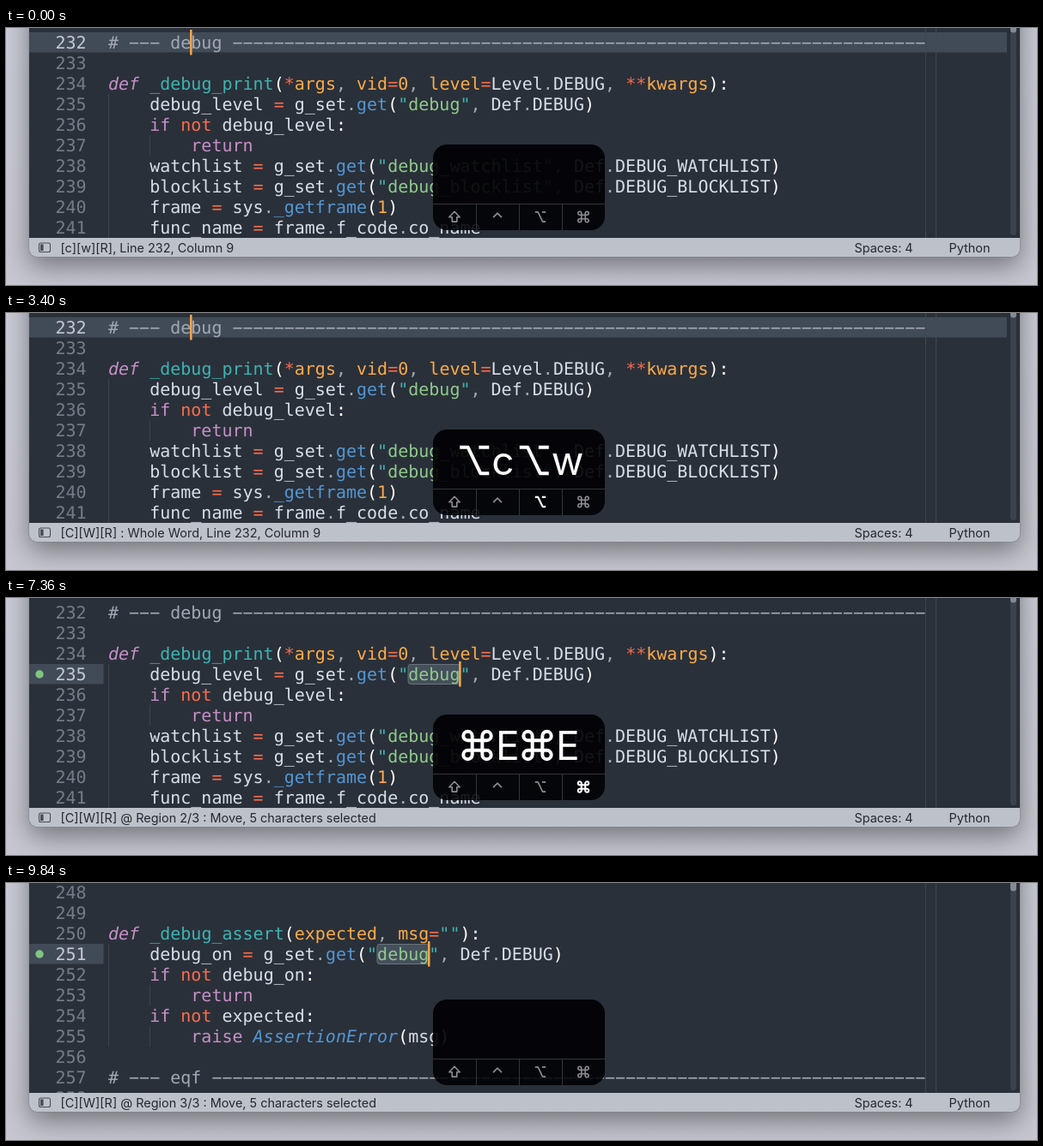
Animation, 1200 px wide and 300 px high, one loop 9.88 s. Source, as an HTML page:

```html
<!DOCTYPE html>
<html lang="en">
<head>
<meta charset="utf-8">
<title>Editor: find by region</title>
<style>
  html, body { margin: 0; width: 100%; height: 100%; overflow: hidden; background: #c3c5cf; }
  svg { display: block; width: 100%; height: 100%; }
  text { white-space: pre; }
  #doc text { font: 20px "DejaVu Sans Mono", monospace; fill: #d8dee9; text-rendering: geometricPrecision; }
  #doc .num { fill: #747c87; }
  #doc .num.on { fill: #c3c8d1; }
  .kw { fill: #c78fc8; }
  .it { font-style: italic; }
  .op { fill: #fb6c4b; }
  .name { fill: #3cb4b2; }
  .call { fill: #5396d3; }
  .arg { fill: #fcab48; }
  .str { fill: #8fca8c; }
  .dim { fill: #a2a8b4; }
  .br { fill: #fff; }
  .bar { font: 14.45px Inter, sans-serif; fill: #25282d; }
  .big { font: 46px Inter, sans-serif; fill: #fff; }
  .line { fill: none; stroke-linejoin: round; }
</style>
</head>
<body>
<svg viewBox="0 0 1200 300" xmlns="http://www.w3.org/2000/svg">
  <defs>
    <linearGradient id="desk" x2="0" y2="1">
      <stop offset="0" stop-color="#c9ccd6"/>
      <stop offset="1" stop-color="#c6c6d0"/>
    </linearGradient>
    <filter id="blur" x="-10%" y="-20%" width="120%" height="150%"><feGaussianBlur stdDeviation="15"/></filter>
    <clipPath id="pane"><rect x="27" width="1153" height="245"/></clipPath>
    <clipPath id="hud"><rect x="497" y="136" width="200" height="100" rx="16"/></clipPath>
  </defs>

  <rect width="1200" height="300" fill="url(#desk)"/>
  <rect x="27" y="-120" width="1153" height="398" rx="10" fill="#000" opacity=".42" filter="url(#blur)"/>
  <rect x="26.5" y="-50" width="1154" height="317.5" rx="9" fill="#7f838c"/>
  <rect x="27" y="-50" width="1153" height="317" rx="9" fill="#bdc1ca"/>

  <g clip-path="url(#pane)">
    <rect x="27" width="1153" height="245" fill="#2a3039"/>
    <g id="doc">
      <rect id="row" x="27" height="23.5" fill="#414b58"/>
      <g id="guides" stroke="#3d444e"></g>
      <rect id="sel" width="60.5" height="23" rx="3" fill="#46505c" stroke="#69747f"/>
      <g id="code"></g>
      <circle id="dot" cx="39" r="4.7" fill="#82c483"/>
      <rect id="caret" width="2.4" height="29.5" fill="#fcab48"/>
    </g>
    <path d="M1070.5 0V245M1082.5 0V245" stroke="#3e4650"/>
    <rect x="1169" y="-20" width="7" height="262" rx="3.5" fill="#3c434d"/>
    <rect id="thumb" x="1169" y="-20" width="7" rx="3.5" fill="#858b94"/>
  </g>

  <rect x="38.5" y="251" width="13" height="10.5" rx="2" fill="none" stroke="#4b4f57" stroke-width="1.1"/>
  <rect x="40" y="252.5" width="3.6" height="7.5" fill="#4b4f57"/>
  <text id="status" class="bar" x="63.5" y="261.5"></text>
  <text class="bar" x="987.5" y="261.5">Spaces: 4</text>
  <text class="bar" x="1097.5" y="261.5">Python</text>

  <g clip-path="url(#hud)">
    <rect x="497" y="136" width="200" height="70" fill="#000004" opacity=".91"/>
    <rect x="497" y="206" width="200" height="30" fill="#000004" opacity=".88"/>
    <path d="M497 205.5H697M547.5 206V236M597.5 206V236M647.5 206V236" stroke="#34353a"/>
  </g>
  <g id="mods"></g>
  <g id="keys"></g>
</svg>
<script>
const $ = id => document.getElementById(id);
const LOOP = 9880, PITCH = 24, COL = 12.041, LEFT = 119, FIRST = 232;
const rule = (name, n = 79) => `# \u2212\u2212\u2212 ${name} `.padEnd(n, '\u2212');

const lines = [
  rule('debug'),
  '',
  'def _debug_print(*args, vid=0, level=Level.DEBUG, **kwargs):',
  '    debug_level = g_set.get("debug", Def.DEBUG)',
  '    if not debug_level:',
  '        return',
  '    watchlist = g_set.get("debug_watchlist", Def.DEBUG_WATCHLIST)',
  '    blocklist = g_set.get("debug_blocklist", Def.DEBUG_BLOCKLIST)',
  '    frame = sys._getframe(1)',
  '    func_name = frame.f_code.co_name',
  '    line_num = frame.f_lineno',
  '    if func_name in watchlist or \\',
  '       (not watchlist and func_name not in blocklist):',
  '        print("{} {}():{} [{}]"',
  '              .format(Level.to_str(level), func_name, line_num, vid), end=" ")',
  '        print(*args, **kwargs)',
  '',
  '',
  'def _debug_assert(expected, msg=""):',
  '    debug_on = g_set.get("debug", Def.DEBUG)',
  '    if not debug_on:',
  '        return',
  '    if not expected:',
  '        raise AssertionError(msg)',
  '',
  rule('eqf'),
  ''
];

const rowY = n => 17 + (n - FIRST) * PITCH;
const colX = c => LEFT + c * COL;
const span = (cls, s) => `<tspan class="${cls}">${s}</tspan>`;

// Syntax rules in order of priority; the first match wins.
const rules = [
  [/^#.*/, 'dim'],
  [/^"[^"]*"/, s => span('name', '"') + span('str', s.slice(1, -1)) + span('name', '"')],
  [/^def\b/, 'kw it'],
  [/^(if|return|raise)\b/, 'kw'],
  [/^(not|and|or|in)\b/, 'op'],
  [/^(print|AssertionError)\b/, 'call it'],
  [/^\w+(?=\()/, (s, def) => span(def ? 'name' : 'call', s)],
  [/^\d+/, 'arg'],
  [/^\w+(?==)/, 'arg'],
  [/^\w+(?=[,)])/, (s, def, prev) => def && prev !== '.' ? span('arg', s) : s],
  [/^\w+/, s => s],
  [/^[*=]+/, 'op'],
  [/^[.,]/, 'dim'],
  [/^[():]+/, 'br'],
  [/^(\s+|.)/, s => s]
];

function paint(src) {
  const def = src.startsWith('def');
  let out = '', i = 0;
  while (i < src.length) {
    const rest = src.slice(i);
    const [re, style] = rules.find(([r]) => r.test(rest));
    const s = re.exec(rest)[0];
    out += typeof style === 'string' ? span(style, s) : style(s, def, src[i - 1]);
    i += s.length;
  }
  return out;
}

$('code').innerHTML = lines.map((s, i) => {
  const n = FIRST + i, y = rowY(n) + 7, indent = s.search(/\S|$/);
  return `<text class="num" x="57.5" y="${y}">${n}</text>` +
    `<text x="${colX(indent)}" y="${y}">${paint(s.trim())}</text>`;
}).join('');
const nums = [...document.querySelectorAll('.num')];

$('guides').innerHTML = lines.map((s, i) => {
  const depth = Math.ceil(s.search(/\S|$/) / 4), y = rowY(FIRST + i) - 12;
  return Array.from({ length: Math.min(depth, 2) }, (_, k) =>
    `<path d="M${Math.round(colX(k * 4)) + .5} ${y}v${PITCH}"/>`).join('');
}).join('');

// Modifier marks, drawn in a box from -1 to 1.
const marks = {
  '⇧': 'M0-1L1 .05H.45V.9H-.45V.05H-1Z',
  '⌃': 'M-.8 .1L0-.7L.8 .1',
  '⌥': 'M-1-.9H-.45L.42 .9H1M.3-.9H1',
  '⌘': 'M-.36-.68V.68A.32 .32 0 1 1-.68 .36H.68A.32 .32 0 1 1 .36 .68V-.68' +
       'A.32 .32 0 1 1 .68-.36H-.68A.32 .32 0 1 1-.36-.68Z'
};
const mark = (m, x, y, size, width, color) =>
  `<path class="line" d="${marks[m]}" transform="translate(${x} ${y}) scale(${size})" ` +
  `stroke="${color}" stroke-width="${width / size}"/>`;

const drawMods = held => Object.keys(marks).map((m, i) =>
  mark(m, 522 + i * 50, 220.5, 6.2, m === held ? 2.1 : 1.6, m === held ? '#fff' : '#8d8d90')).join('');

const advance = { '⌥': 43, '⌘': 43, c: 26.5, w: 37, E: 27 };
function drawKeys(keys) {
  const total = [...keys].reduce((sum, k) => sum + advance[k], 0);
  const scale = Math.min(1, 188 / total);
  let x = -total / 2, out = '';
  for (const k of keys) {
    out += marks[k]
      ? mark(k, x + (k === '⌥' ? 23 : 21.5), 0, k === '⌥' ? 17 : 16.2, 4, '#fff')
      : `<text class="big" x="${x}" y="17">${k}</text>`;
    x += advance[k];
  }
  return `<g transform="translate(597 172) scale(${scale})">${out}</g>`;
}

const place = ', Line 232, Column 9';
const region = n => `[C][W][R] @ Region ${n}/3 : Move, 5 characters selected`;
const JUMP = 7480, GLIDE = 290, TRAVEL = 390;

// Each step changes some of the state and keeps the rest.
const steps = [
  { at: 0, held: '', keys: '', row: 232, col: 8, sel: false, status: '[c][w][R]' + place },
  { at: 1120, held: '⌥' },
  { at: 1320, keys: '⌥c', status: '[C][w][R] : Case Sensitive' + place },
  { at: 2520, keys: '⌥c⌥w', status: '[C][W][R] : Whole Word' + place },
  { at: 3840, held: '', keys: '' },
  { at: 4400, held: '⌘' },
  { at: 4640, keys: '⌘E', col: 11, sel: true, status: region(1) },
  { at: 6480, keys: '⌘E⌘E', row: 235, col: 34, status: region(2) },
  { at: JUMP, keys: '⌘E⌘E⌘E', row: 251, col: 31, status: region(3) },
  { at: 8520, held: '', keys: '' }
];

const set = (id, attrs) => {
  for (const k in attrs) $(id).setAttribute(k, attrs[k]);
};

let shown = -1;
function show(index) {
  shown = index;
  const s = Object.assign({}, ...steps.slice(0, index + 1));
  const y = rowY(s.row), x = colX(s.col), vis = s.sel ? 'visible' : 'hidden';
  set('row', { y: y - 12, width: s.sel ? 86.5 : 1138 });
  set('sel', { x: x - 60.3, y: y - 11.5, visibility: vis });
  set('dot', { cy: y, visibility: vis });
  set('caret', { x: x - 1.2, y: y - 15 });
  nums.forEach((el, i) => el.classList.toggle('on', FIRST + i === s.row));
  $('status').textContent = s.status;
  $('mods').innerHTML = drawMods(s.held);
  $('keys').innerHTML = drawKeys(s.keys);
}

function render(t) {
  const index = steps.filter(s => s.at <= t).length - 1;
  if (index !== shown) show(index);
  const p = Math.min(1, Math.max(0, (t - JUMP) / GLIDE));
  const scroll = TRAVEL * (1 - (1 - p) ** 2);
  set('doc', { transform: `translate(0 ${-scroll})` });
  set('thumb', { height: 25.5 + scroll * .01 });
}

function tick() {
  render(performance.now() % LOOP);
  requestAnimationFrame(tick);
}
tick();
</script>
</body>
</html>
```
